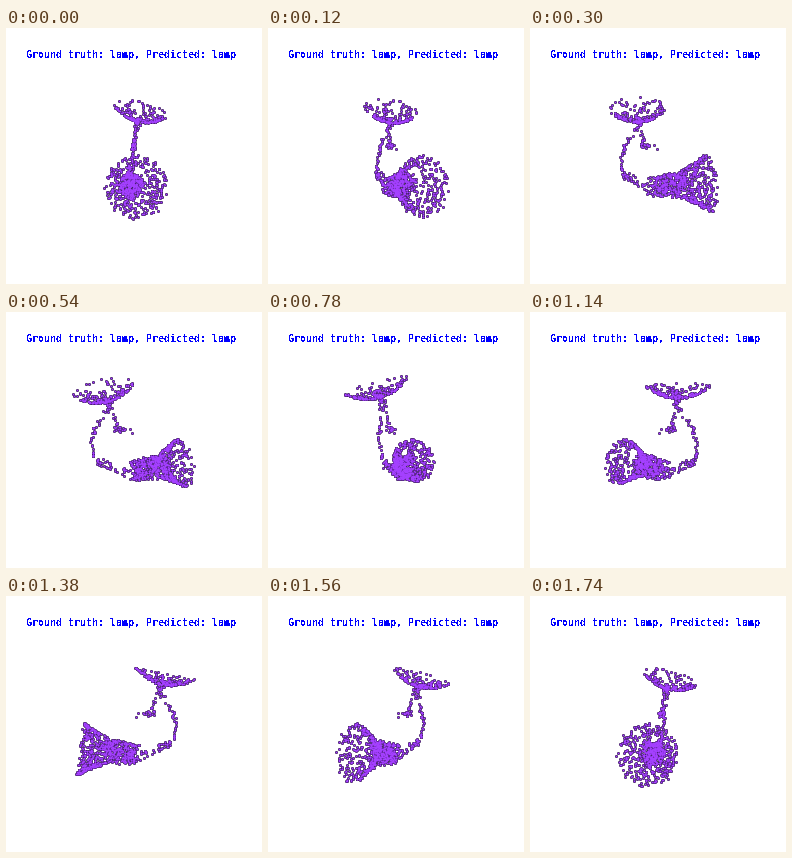
Animation of 256x256 px, one loop 1.8 s. Source, as a matplotlib script:

```python
import numpy as np
import matplotlib.pyplot as plt
from matplotlib.animation import FuncAnimation

SIZE, DPI = 256, 100
FRAMES, STEP = 30, 60
FOCAL = 280
CENTER = (128, 125)
START = np.radians(2)
PX = 72 / DPI

rng = np.random.default_rng(7)


def curve(n, nodes, spread):
    """Jittered points on a Bezier curve of (radial, lateral, height) nodes."""
    t = rng.random((n, 1))
    pts = [np.array(p, float) for p in nodes]
    while len(pts) > 1:
        pts = [a + (b - a) * t for a, b in zip(pts, pts[1:])]
    return pts[0] + rng.uniform(-spread, spread, (n, 3))


def shade(rho, fill=1):
    """Points on a bell whose axis rises slightly towards its rim."""
    neck = 13 * (1 - np.exp(-(rho + 16) / 11))
    flare = 12.5 * (np.maximum(rho - 24, 0) / 29) ** 1.5
    r = (neck + flare) * fill
    phi = rng.uniform(0, 2 * np.pi, len(rho))
    drop = r * np.sin(phi)
    pts = [rho + 0.14 * drop, 0.09 * rho - 4.8 + r * np.cos(phi), 32.3 - 0.1 * rho + drop]
    return np.stack(pts, axis=1) + rng.normal(0, 0.5, (len(rho), 3))


def canopy(n, radius=29.5, tilt=0.28, low=np.radians(130)):
    """Shallow tilted dish with its apex below the rim."""
    s = np.sqrt(rng.random(n))
    phi = rng.uniform(0, 2 * np.pi, n)
    depth = 11 * (1 - s ** 2)
    rho = -29.5 + radius * s * np.cos(phi) - tilt * np.cos(low) * depth
    lateral = 8 + radius * s * np.sin(phi) - tilt * np.sin(low) * depth
    height = -47 + tilt * radius * s * np.cos(phi - low) + depth
    return np.stack([rho, lateral, height], axis=1)


def build_lamp():
    fill = np.sqrt(rng.random(330))
    return np.vstack([
        shade(30 + 23 * rng.random(310) ** 0.75),
        shade(rng.uniform(-2, 32, 330), fill),
        shade(rng.uniform(-15, 0, 24)),
        canopy(175),
        curve(22, [(-27, 5, -37), (-24, 4, -28)], 3),
        curve(48, [(-24, 4, -29), (-51, -2, -4), (-53, -5, 30), (-8, -6, 34)], 1.8),
        curve(14, [(-37, -4, 22), (-25, -5, 28)], 3.5),
        curve(8, [(-23, 3, -24), (-16, 0, -11)], 1.5),
        curve(17, [(-19, 0, -8), (-3, 0, -6)], 2.5),
    ])


def project(pts, angle):
    rho, lateral, height = pts.T
    x = rho * np.sin(angle) + lateral * np.cos(angle)
    z = rho * np.cos(angle) - lateral * np.sin(angle)
    k = FOCAL / (FOCAL - z)
    return CENTER[0] + x * k, CENTER[1] + height * k


lamp = build_lamp()

fig = plt.figure(figsize=(SIZE / DPI, SIZE / DPI), dpi=DPI, facecolor="white")
ax = fig.add_axes([0, 0, 1, 1])
ax.set_xlim(0, SIZE)
ax.set_ylim(SIZE, 0)
ax.axis("off")
ax.text(19.5, 29.5, "Ground truth: lamp, Predicted: lamp", color="#0000ff",
        family="DejaVu Sans Mono", weight="bold", size=9.9 * PX,
        va="baseline", antialiased=False)


def dots(color, diameter):
    return ax.plot([], [], "o", color=color, ms=diameter * PX, mew=0,
                   antialiased=False)[0]


layers = [dots("#1c0a30", 3), dots("#a440ff", 2)]


def draw(i):
    x, y = project(lamp, START + 2 * np.pi * i / FRAMES)
    for layer in layers:
        layer.set_data(x, y)
    return layers


anim = FuncAnimation(fig, draw, frames=FRAMES, interval=STEP, repeat=True, repeat_delay=0)
plt.show()
```
